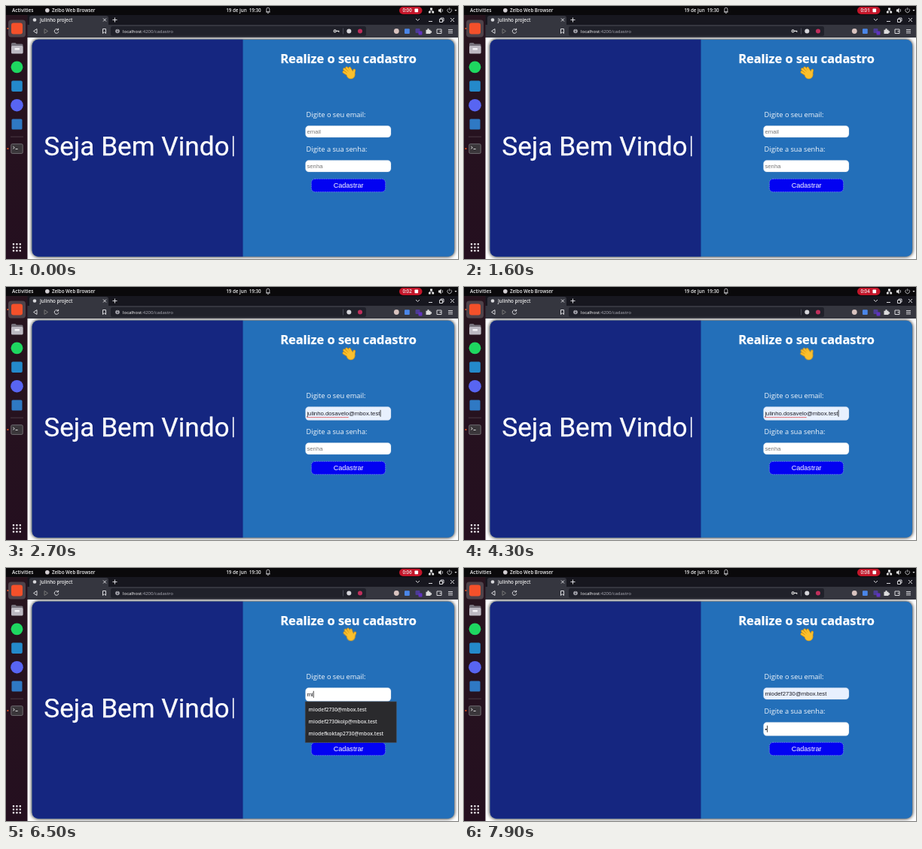
Write an HTML page that moves like this. It is 600x337 px and loops after 8 s.

```html
<!DOCTYPE html>
<html lang="pt-BR">
<head>
<meta charset="utf-8">
<title>Cadastro</title>
<style>
html, body { margin: 0; width: 100%; height: 100%; overflow: hidden; background: #fff; }
svg { display: block; width: 100vw; height: 100vh; }
text { font-family: "Open Sans", "Noto Sans", sans-serif; white-space: pre; }
.bar { font-size: 6.2px; fill: #eee; font-weight: 600; }
.label { font-size: 9.24px; fill: #f4f8fc; }
.input { font: 7.75px "Liberation Sans", Arial, sans-serif; }
.line { fill: none; stroke: #d8d8dc; stroke-width: 1; }
.box { fill: #fff; stroke: #b9c6d6; stroke-width: .5; stroke-dasharray: 1.2 1; }
.option { font-size: 6.75px; font-weight: 600; fill: #e6e6e6; }
.card { filter: drop-shadow(.5px .5px 2.5px #000); }

#hand {
  transform-box: view-box; transform-origin: 458px 92.5px;
  animation: wave 2s infinite;
}
@keyframes wave {
  0%, 60%, 100% { transform: rotate(0deg); }
  10%, 30% { transform: rotate(14deg); }
  20% { transform: rotate(-8deg); }
  40% { transform: rotate(-4deg); }
  50% { transform: rotate(10deg); }
}
#welcome { animation: fade 8s linear infinite; }
@keyframes fade {
  0%, 87% { opacity: 1; }
  97.5%, 99.99% { opacity: 0; }
  100% { opacity: 1; }
}
</style>
</head>
<body>
<svg viewBox="0 0 600 337" preserveAspectRatio="none">
  <defs>
    <linearGradient id="dockFill" x2="0" y2="1">
      <stop stop-color="#28151f"/><stop offset="1" stop-color="#240f1f"/>
    </linearGradient>
  </defs>

  <!-- page -->
  <rect x="28" y="42" width="572" height="295" fill="#fff"/>
  <g class="card">
    <rect x="34.7" y="44.8" width="560.3" height="288.9" rx="8" fill="#236fb9"/>
    <path d="M314.5 44.8H42.7a8 8 0 0 0-8 8V325.7a8 8 0 0 0 8 8H314.5z" fill="#152680"/>
  </g>
  <g id="welcome" fill="#fff">
    <text x="50.3" y="199.2" stroke="#fff" stroke-width=".25" style="font:35.2px Roboto,sans-serif">Seja Bem Vindo</text>
    <rect x="300.9" y="173.2" width="1.6" height="27"/>
  </g>

  <!-- form -->
  <text x="454.5" y="75.6" text-anchor="middle" font-size="16.4" font-weight="700" fill="#fff" stroke="#fff" stroke-width=".25">Realize o seu cadastro</text>
  <g id="hand">
    <g transform="translate(.7 .9)" stroke-linecap="round" fill="none">
      <g stroke="#d8920c" stroke-width="3.5">
        <path d="M454 91L447.6 87M455 89L448.3 83.2M457 88L451.4 81.4M459 88L455.4 81.8M460.4 91L461.6 84.6"/>
      </g>
      <circle cx="457" cy="90.6" r="5.5" fill="#fac02e" stroke="#d8920c" stroke-width=".6"/>
      <g stroke="#fac02e" stroke-width="2.2">
        <path d="M454 91L447.6 87M455 89L448.3 83.2M457 88L451.4 81.4M459 88L455.4 81.8M460.4 91L461.6 84.6"/>
      </g>
    </g>
  </g>
  <text class="label" x="398.6" y="148.4">Digite o seu email:</text>
  <rect id="emailBox" class="box" x="397.5" y="159.5" width="113.5" rx="4.5"/>
  <text id="email" class="input" x="399.4"></text>
  <path id="spell" fill="none" stroke="#e03030" stroke-width=".9" stroke-dasharray="1.4 .5"/>
  <g id="lower">
    <text class="label" x="398.6" y="194.4">Digite a sua senha:</text>
    <rect id="passBox" class="box" x="397.5" y="205.5" width="113.5" rx="4.5"/>
    <text id="pass" class="input" x="399.4"></text>
  </g>
  <g id="button">
    <rect x="405.3" y="230.3" width="98.4" height="17.4" rx="5" fill="#0202f2" stroke="#9fb4f4" stroke-width=".7" stroke-dasharray="1.3 1.1"/>
    <text x="454.6" y="242.1" text-anchor="middle" fill="#fff" style="font:9.1px 'Liberation Sans',Arial,sans-serif">Cadastrar</text>
  </g>
  <rect id="caret" width=".8" height="9" fill="#111"/>
  <g id="popup"></g>

  <!-- browser -->
  <rect x="28" y="12" width="572" height="14" fill="#17171f"/>
  <path d="M28 42V25h3V16a3 3 0 0 1 3-3h99a3 3 0 0 1 3 3v9H600V42z" fill="#35363f"/>
  <circle cx="38" cy="18.5" r="2.3" fill="#d8d8dc"/>
  <text class="bar" x="45" y="20.8">Julinho project</text>
  <path class="line" d="M129 16.5l4 4m0-4l-4 4M141.5 18.5h6m-3-3v6M544 17l2.5 2.5l2.5-2.5M561 20.5h5M575.5 17.5h4v4h-4zM577 17.5v-1.5h4v4h-1.5M590 16l5 5m0-5l-5 5"/>
  <path class="line" d="M41 30.5l-4.5 3l4.5 3zM128.5 30.5h4v6l-2-1.7l-2 1.7z"/>
  <path class="line" d="M51 30.5l4.5 3l-4.5 3z" style="stroke:#777"/>
  <path class="line" d="M69 31.5a2.8 2.8 0 1 0 .8 2.5M69.6 29.8v2.2h-2.2"/>
  <rect x="139" y="27" width="339" height="13" rx="2.5" fill="#20212a"/>
  <circle cx="148" cy="33.5" r="2.8" fill="#a5a5ad"/>
  <path d="M148 32.9v2.2M148 31.3v.8" stroke="#20212a"/>
  <text x="155" y="35.6" font-size="6" fill="#fff">localhost<tspan fill="#b0b0ba">:4200/cadastro</tspan></text>
  <g id="key" fill="none" stroke="#ddd" stroke-width="1.1">
    <circle cx="436.6" cy="33.4" r="1.5"/><path d="M438 33.4h3.8v1.6"/>
  </g>
  <path d="M447.5 29.5v8" stroke="#555762" stroke-width=".8"/>
  <circle cx="455.3" cy="33.5" r="3" fill="#d5d5da"/>
  <circle cx="470" cy="33.5" r="3" fill="#c02f5c"/>
  <circle cx="518.3" cy="33.5" r="3.4" fill="#d9c4c0"/>
  <rect x="529" y="30.2" width="6.8" height="6.8" rx="1" fill="#4a86e8"/>
  <rect x="543.5" y="30" width="6" height="6" rx="1" fill="#4c3c96"/>
  <rect x="547.5" y="33.5" width="5" height="5" rx="1" fill="#6032c0"/>
  <path d="M557.5 31.8h1.9a1.2 1.2 0 1 1 2.2 0h1.9v1.6a1.2 1.2 0 1 1 0 2.2v1.4h-6z" fill="#ddd"/>
  <path class="line" d="M572 31h6v5.5h-6zM575.5 33.7h2.5M587 31.5h6m-6 2.2h6m-6 2.2h6"/>

  <!-- dock -->
  <rect y="12" width="28.5" height="325" fill="url(#dockFill)"/>
  <rect x="3" y="18.5" width="23" height="23" rx="4" fill="#4f434a"/>
  <rect x="7" y="22.5" width="15" height="15" rx="3" fill="#f4502a"/>
  <path d="M7 50.5a1.5 1.5 0 0 1 1.5-1.5h4l1.5 1.5h7a1.5 1.5 0 0 1 1.5 1.5v10.5H7z" fill="#77727c"/>
  <rect x="7" y="53" width="15.5" height="10.5" rx="1.5" fill="#bdb9c2"/>
  <rect x="11.5" y="56" width="6.5" height="2.6" rx=".8" fill="#f4f2f6"/>
  <circle cx="14.5" cy="81.3" r="7.9" fill="#1ed760"/>
  <rect x="7.2" y="99.5" width="14.6" height="14.6" rx="2" fill="#2489ca"/>
  <circle cx="14.5" cy="132.2" r="8.3" fill="#5865f2"/>
  <rect x="7.5" y="150.5" width="14" height="14" rx="1.5" fill="#2f79c4"/>
  <path d="M6 174.2h17" stroke="#54454f" stroke-width=".8"/>
  <rect x="6.8" y="183.8" width="15.4" height="12.6" rx="1.5" fill="#3a363a" stroke="#777278" stroke-width=".9"/>
  <path d="M9.3 187l2 1.6l-2 1.6M12.6 190.5h3" fill="none" stroke="#eee" stroke-width=".9"/>
  <circle cx="2.4" cy="30" r="1.1" fill="#e95420"/><circle cx="2.4" cy="190" r="1.1" fill="#e95420"/>
  <g id="apps" fill="#e8e4e8"></g>

  <!-- system bar -->
  <rect width="600" height="12" fill="#0a090b"/>
  <text class="bar" x="8" y="8.2" style="font-size:6.5px">Activities</text>
  <circle cx="54.8" cy="5.8" r="2.8" fill="#d4d0d4"/>
  <text class="bar" x="61" y="8.2">Zelbo Web Browser</text>
  <text class="bar" x="292.3" y="8.2">19 de jun  19:30</text>
  <path class="line" d="M345.8 7.8v-3.6a2 2 0 0 1 4 0v3.6zM345 8h5.6M347 9.6h1.6" style="stroke-width:.8"/>
  <rect x="522" y="1" width="30.5" height="10" rx="5" fill="#c4162a"/>
  <text id="clock" class="bar" x="526.4" y="8.2"></text>
  <rect x="542.5" y="3.6" width="4.6" height="4.6" rx=".6" fill="#fff"/>
  <path d="M563 2.5h3v2.5h-3zM561 7h2.7v2.5H561zM565.4 7h2.7v2.5h-2.7zM574 4.5h1.6l2-2v7l-2-2H574z" fill="#e8e8e8"/>
  <path class="line" d="M564.5 5v1.2M562.3 7v-.9h4.4v.9M579 4q1.4 1.9 0 3.8M587 3.6a2.8 2.8 0 1 0 3.4 0M588.7 2.3v3.2" style="stroke-width:.8"/>
  <path d="M595.5 5h3l-1.5 2z" fill="#ddd"/>
</svg>

<script>
const $ = id => document.getElementById(id);
const LOOP = 8000;
const FIRST = 'julinho.dosavelo@mbox.test';
const SECOND = 'miodef2730@mbox.test';
const ALL = [FIRST, SECOND, 'juliodosavelano871987@mundox.test', 'asdasd', 'asdas', 'awdawd'];
const MATCHES = [SECOND, 'miodef2730kolp@mbox.test', 'miodefkoktap2730@mbox.test'];
const TICKS = [800, 1800, 2750, 3700, 4750, 5750, 6700, 7700];
const ERASE = { from: 4900, to: 5700 };

// Each step overrides the values set before it.
const STEPS = [
  [0, { email: '', pass: '', focus: '', list: null, filled: false, key: true, preview: false, spell: false }],
  [2000, { list: 'all' }],
  [2100, { email: FIRST, filled: true, preview: true }],
  [2500, { list: null, preview: false, focus: 'email', key: false, spell: true }],
  [3150, { focus: '' }],
  [3600, { focus: 'email' }],
  [ERASE.from, { filled: false }],
  [ERASE.to, { email: '', spell: false }],
  [6050, { email: 'm', list: 'some' }],
  [6300, { email: 'mi' }],
  [6950, { email: SECOND, list: null, filled: true, key: true }],
  [7350, { focus: 'pass' }],
  [7800, { pass: '•' }]
];

function stateAt(t) {
  const s = Object.assign({}, ...STEPS.filter(step => step[0] <= t).map(step => step[1]));
  if (t >= ERASE.from && t < ERASE.to) {
    const left = (ERASE.to - t) / (ERASE.to - ERASE.from);
    s.email = FIRST.slice(0, Math.ceil(FIRST.length * left));
  }
  return s;
}

function field(id, value, hint, top, focused) {
  const height = focused ? 18 : 15.5;
  $(id + 'Box').setAttribute('height', height);
  const el = $(id);
  el.textContent = value || hint;
  el.setAttribute('y', top + height / 2 + 2.6);
  el.setAttribute('fill', value ? '#1c1c22' : '#777');
}

let shown = null;
function popup(list) {
  if (list === shown) return;
  shown = list;
  if (!list) { $('popup').innerHTML = ''; return; }
  const all = list === 'all';
  const rows = all ? ALL : MATCHES;
  const top = all ? 176 : 178;
  const width = all ? 137 : 121;
  const height = rows.length * 15.8 + 7;
  const items = rows.map((row, i) =>
    `<text class="option" x="401.6" y="${top + 13.4 + i * 15.8}">${row}</text>`);
  $('popup').innerHTML =
    `<rect x="397.2" y="${top}" width="${width}" height="${height}" fill="#2a2a2d" stroke="#4a4a4e" stroke-width=".6"/>` +
    (all ? `<rect x="397.5" y="${top + 3.5}" width="${width - .6}" height="15.8" fill="#404045"/>` : '') +
    items.join('');
}

function drawCaret(s, t) {
  const caret = $('caret');
  const lit = t > 5700 || t % 1000 >= 250 && t % 1000 < 750;
  caret.style.display = s.focus && lit ? '' : 'none';
  if (!s.focus) return;
  const width = s[s.focus] ? $(s.focus).getComputedTextLength() : 0;
  caret.setAttribute('x', 399.6 + width);
  caret.setAttribute('y', s.focus === 'pass' ? 209.8 : 163.8);
}

function draw(now) {
  const t = now % LOOP;
  const s = stateAt(t);
  const onEmail = s.focus === 'email';
  $('clock').textContent = '0:0' + TICKS.filter(x => x <= t).length;
  $('key').style.display = s.key ? '' : 'none';

  field('email', s.email, 'email', 159.5, onEmail);
  field('pass', s.pass, 'senha', 205.5, s.focus === 'pass');
  $('emailBox').style.fill = s.filled ? '#e8f0fe' : '#fff';
  $('email').style.fontSize = s.preview ? '5.95px' : '';
  $('lower').setAttribute('transform', `translate(0 ${onEmail ? 2 : 0})`);
  $('button').setAttribute('transform', `translate(0 ${s.focus ? 2 : 0})`);

  const wrong = s.spell && onEmail ? Math.min(16, s.email.length) : 0;
  const end = wrong ? $('email').getSubStringLength(0, wrong) : 0;
  $('spell').setAttribute('d', wrong ? `M399.4 173.6h${end}` : '');

  drawCaret(s, t);
  popup(s.list);
}

for (let i = 0; i < 9; i++) {
  $('apps').innerHTML += `<rect x="${8.8 + i % 3 * 4.4}" y="${316 + Math.floor(i / 3) * 4.4}" width="2.4" height="2.4" rx=".7"/>`;
}

const start = performance.now();
function loop() {
  draw(performance.now() - start);
  requestAnimationFrame(loop);
}
loop();
</script>
</body>
</html>
```
